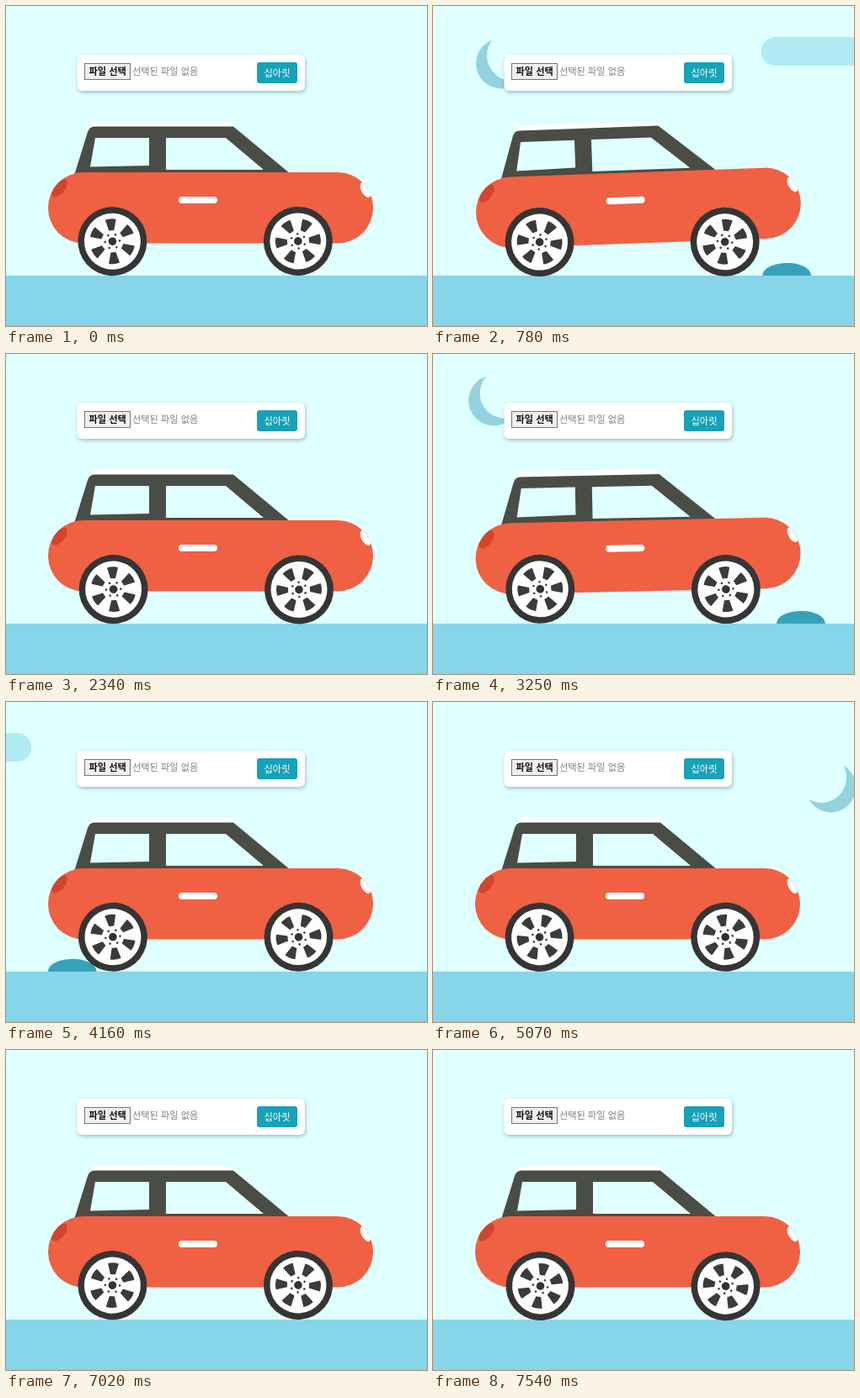
Write an HTML page that moves like this. It is 500 px wide and 381 px high and loops after 8000 ms.

```html
<!DOCTYPE html>
<html lang="ko">
<head>
<meta charset="utf-8">
<title>Driving car</title>
<style>
  html, body { margin: 0; width: 100%; height: 100%; overflow: hidden; background: #e0ffff; }
  svg { display: block; width: 500px; height: 381px; }
  text { font-family: "Noto Sans CJK KR", "Noto Sans CJK", sans-serif; font-size: 11.2px; }
  .panel { filter: drop-shadow(1px 2px 2px rgba(0, 40, 50, .3)); }
</style>
</head>
<body>
<svg viewBox="0 0 500 381">
  <defs>
    <clipPath id="shell"><rect x="50" y="198" width="386" height="84.500" rx="42"/></clipPath>
    <g id="wheel">
      <circle r="41" fill="#353535"/>
      <circle r="33.500" fill="#fdfdfd"/>
      <g id="spokes" fill="#3b3b3b"></g>
      <circle r="4.800" fill="#333"/>
    </g>
  </defs>

  <rect width="500" height="381" fill="#e0ffff"/>
  <path id="moon" fill="#93d2de" d="M-8-28.900A30 30 0 1 1-8 28.900A30 30 0 0 0-8-28.900Z"/>
  <rect id="cloud" y="37" width="274" height="34" rx="17" fill="#b0ebf6"/>

  <g id="car">
    <path d="M100 145Q101 137.500 107 137.500H264Q270 137.500 272 145Z" fill="#fdfffe"/>
    <path fill="#494d46" fill-rule="evenodd" d="M81.500 200L97 150Q99 143.500 105 143.500H270L338 200Z
      M106 157L100 191.500L170 190V157Z M190 157V195H306L261 157Z"/>
    <rect x="50" y="198" width="386" height="84.500" rx="42" fill="#f06043"/>
    <g clip-path="url(#shell)">
      <ellipse rx="6.500" ry="12.500" transform="translate(63.500 217) rotate(38)" fill="#d0462f"/>
      <ellipse rx="5" ry="9.800" transform="translate(427 219) rotate(-28)" fill="#fff"/>
    </g>
    <rect x="205" y="227" width="46" height="8" rx="4" fill="#fff"/>
  </g>

  <path id="rock" d="M-29 322C-29 311-14 306 1 306S29 312 29 322Z" fill="#36a2ba"/>
  <rect y="321" width="500" height="60" fill="#87d5e8"/>
  <use id="rear" href="#wheel"/>
  <use id="front" href="#wheel"/>

  <rect class="panel" x="84.500" y="58" width="270.500" height="43" rx="6" fill="#fff"/>
  <rect x="93.500" y="68.500" width="54" height="19" fill="#efefef" stroke="#767676"/>
  <text x="98.500" y="82" font-weight="700" fill="#111">파일 선택</text>
  <text x="150" y="82" font-weight="500" fill="#808080">선택된 파일 없음</text>
  <rect x="298" y="67" width="48" height="25" rx="3" fill="#17a2b8"/>
  <text x="322" y="83.500" text-anchor="middle" fill="#fff">십아릿</text>
</svg>
<script>
  const LOOP = 8000, STEP = 130;
  const el = id => document.getElementById(id);
  const place = (id, value) => el(id).setAttribute('transform', value);

  // Six identical openings and bolts around the hub
  el('spokes').innerHTML = Array.from({ length: 6 }, (_, i) =>
    `<g transform="rotate(${i * 60})"><path d="M13-3L26-6.500Q28 0 26 6.500L13 3Z"/>` +
    `<circle cx="7.500" cy="4.300" r="1.300"/></g>`).join('');

  // Spans in which the picture stands still
  const stalls = [[390, 780], [780, 1040], [1560, 1820], [1950, 2210],
                  [5070, 5590], [6110, 6370], [6630, 7020], [7540, LOOP]];

  function heldTime(t) {
    const stall = stalls.find(([from, to]) => t >= from && t < to);
    return stall ? stall[0] : Math.floor(t / STEP) * STEP;
  }

  const wrap = (v, min, span) => ((v - min) % span + span) % span + min;

  // The car rocks nose up, then tail up, as the rock passes beneath it
  function tiltFor(rock) {
    const d = 273 - rock, reach = Math.abs(d);
    return Math.sign(d) * Math.max(0, Math.min(reach * .0475, (188 - reach) * .05));
  }

  function draw(t) {
    const clock = t - 73 * Math.sin((t - 1430) / 1490); // slightly uneven pace
    const rock = wrap(740 - .3945 * clock, -60, 952);
    const cloud = wrap(1054.6 - .82 * clock, -300, 2055);
    const orbit = 26 + .152 * t - 1.2e-6 * t * t;
    const spin = .36 * (t - 1430);

    place('moon', `translate(291 -85) rotate(${orbit}) translate(260 0)`);
    place('cloud', `translate(${cloud} 0)`);
    place('rock', `translate(${rock} 0)`);
    place('car', `rotate(${tiltFor(rock)} 243 215)`);
    // Wheels sit slightly off their axle
    place('rear', `translate(127 280.500) rotate(${spin}) translate(.7 0)`);
    place('front', `translate(347.300 280.500) rotate(${spin + 30}) translate(.7 0)`);
  }

  const begin = performance.now();
  function frame() {
    draw(heldTime((performance.now() - begin) % LOOP));
    requestAnimationFrame(frame);
  }
  frame();
</script>
</body>
</html>
```
